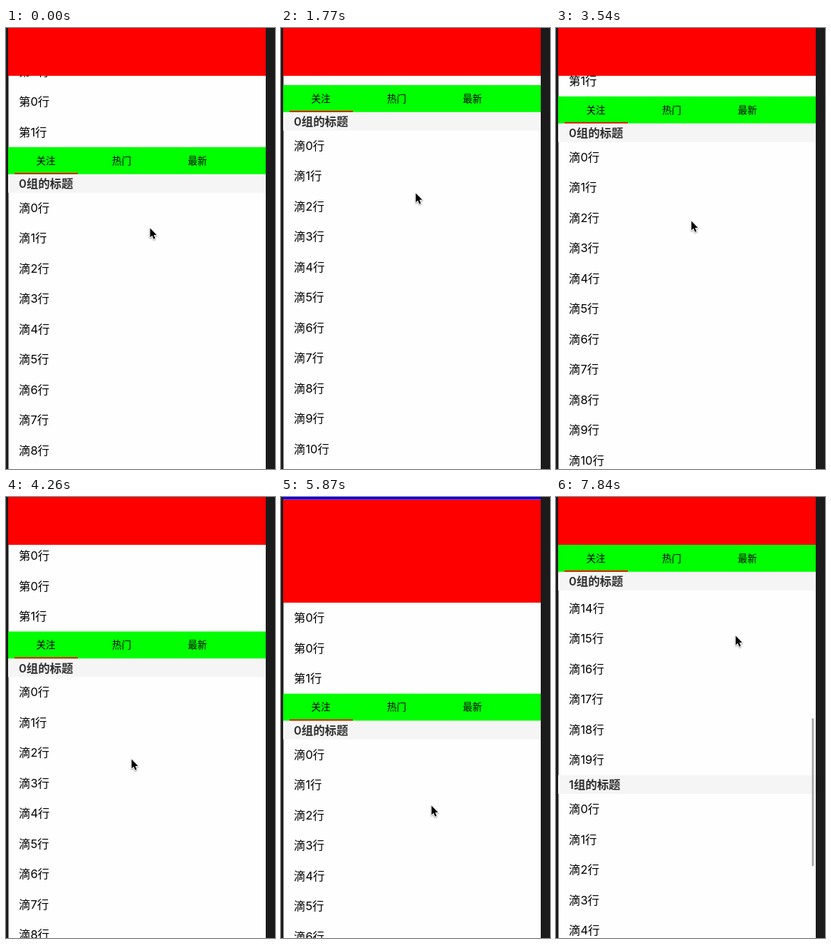
These frames come from a looping animation (378x618 px, 8 s). An HTML page with a canvas:

```html
<!DOCTYPE html>
<html lang="zh-CN">
<head>
<meta charset="utf-8">
<style>
html, body { margin: 0; width: 100%; height: 100%; overflow: hidden; background: #1b1b1c; }
canvas { display: block; }
</style>
</head>
<body>
<canvas id="stage" width="378" height="618"></canvas>
<script>
const ctx = document.getElementById('stage').getContext('2d');
const LOOP = 8000, STEP = 178, LEFT = 3, RIGHT = 365;
const PIN = 67, COVER = 144.5, ROW = 42.5, TABS = 37.8, HEAD = 26.1, ROWS = 20;
const FONT = 'Inter, "Noto Sans CJK SC", "Noto Sans CJK", sans-serif';
const arrow = new Path2D('M0 0V13L2.9 10.2L5 15.2L7.2 14.3L5.1 9.4H9.2Z');

// Drags: each ends at a step with a scroll position and a pointer place.
const linear = u => u, fling = u => u * u;
const drags = [
  { end: 0, pos: 167, x: 202.5, y: 280.5 },
  { end: 7, pos: 140, x: 178.5, y: 280.5, ease: linear },
  { end: 15, pos: -20, x: 207.5, y: 149.5, ease: linear },
  { end: 24, pos: 188.5, x: 176.5, y: 367.5, ease: linear },
  { end: 31, pos: 275.6, x: 211.5, y: 432.5, ease: linear },
  { end: 38, pos: 271.5, x: 187, y: 510.5, ease: linear },
  { end: 42, pos: -524, x: 252.5, y: 194.5, ease: fling }
];

// The screen refreshes in steps and rests for two of them.
function stepAt(t) {
  const k = Math.floor((t + 30) / STEP);
  return Math.min(42, k - Math.max(0, Math.min(2, k - 27)));
}

function pose(k) {
  const i = Math.max(1, drags.findIndex(d => d.end >= k));
  const a = drags[i - 1], b = drags[i];
  const u = b.ease((k - a.end) / (b.end - a.end));
  const mix = key => a[key] + (b[key] - a[key]) * u;
  return { pos: mix('pos'), x: mix('x'), y: mix('y') };
}

function box(color, y, h, x = LEFT, w = RIGHT - x) {
  ctx.fillStyle = color;
  ctx.fillRect(x, y, w, h);
}

function text(str, x, y, size = 16.4, weight = 400, color = '#000') {
  ctx.font = `${weight} ${size}px ${FONT}`;
  ctx.fillStyle = color;
  ctx.fillText(str, x, y);
}

function row(label, y) {
  text(label, 18, y + 27);
}

function sectionHead(n, y) {
  box('#f5f5f5', y, HEAD);
  text(n + '组的标题', 18, y + 19.3, 16.4, 600, '#2e2e2e');
}

function drawList(top, scroll) {
  for (let s = 0; s < 2; s++) {
    const y = top + s * (HEAD + ROWS * ROW) - scroll;
    for (let r = 0; r < ROWS; r++) row(`滴${r}行`, y + HEAD + r * ROW);
    sectionHead(s, Math.max(top, y));
  }
}

function drawTabs(y) {
  box('#0f0', y, TABS);
  ctx.textAlign = 'center';
  ['关注', '热门', '最新'].forEach((name, i) => text(name, 56 + i * 106.5, y + 23.7, 13.5));
  ctx.textAlign = 'left';
  box('#f00', y + TABS - 1.8, 1.8, 12, 89);
}

function drawPointer(x, y) {
  ctx.save();
  ctx.translate(x, y);
  ctx.lineJoin = 'round';
  ctx.lineWidth = 2;
  ctx.strokeStyle = '#fff';
  ctx.shadowColor = 'rgba(0,0,0,.4)';
  ctx.shadowBlur = 2;
  ctx.shadowOffsetY = 1;
  ctx.stroke(arrow);
  ctx.shadowColor = 'transparent';
  ctx.fillStyle = '#000';
  ctx.fill(arrow);
  ctx.restore();
}

function draw(t) {
  const { pos, x, y } = pose(stepAt(t));
  const tabY = Math.max(PIN, pos), scroll = Math.max(0, PIN - pos);
  const rowsY = tabY - 3 * ROW, coverEnd = Math.max(PIN, rowsY);

  box('#1b1b1c', 0, 618, 0, 378);
  box('#fefefe', 0, 618, LEFT + 0.5);
  drawList(tabY + TABS, scroll);
  [0, 0, 1].forEach((n, i) => row(`第${n}行`, rowsY + i * ROW));
  drawTabs(tabY);
  box('#00f', 0, Math.max(0, coverEnd - COVER));
  box('#f00', coverEnd - COVER, COVER);

  if (scroll > 0) {
    ctx.fillStyle = '#a3a3a3';
    ctx.beginPath();
    ctx.roundRect(359.6, 107.2 + scroll * 0.343, 2.6, 207.5, 1.3);
    ctx.fill();
  }
  drawPointer(x, y);
}

function tick(now) {
  draw(now % LOOP);
  requestAnimationFrame(tick);
}
requestAnimationFrame(tick);
</script>
</body>
</html>
```
